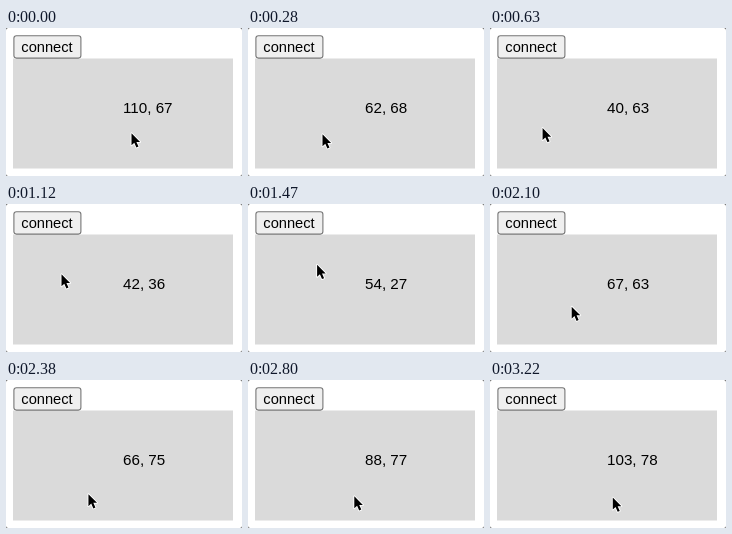
Recreate the animation shown at these times as an HTML page with a canvas. Size 236 by 148 pixels, loop 3.29 s.

```html
<!DOCTYPE html>
<html lang="en">
<head>
<meta charset="utf-8">
<title>Pointer position</title>
<style>
html, body { margin: 0; width: 100%; height: 100%; overflow: hidden; background: #fff; }
canvas { display: block; width: 236px; height: 148px; }
</style>
</head>
<body>
<canvas id="stage"></canvas>
<script>
const W = 236, H = 148, LOOP = 3290, STEP = 70, KEY = 280, LAG = 20;
const canvas = document.getElementById('stage');
const ctx = canvas.getContext('2d');
const dpr = window.devicePixelRatio || 1;
canvas.width = W * dpr;
canvas.height = H * dpr;
ctx.scale(dpr, dpr);

// Key points of the pointer's sweep, evenly spaced; the first precedes the loop.
const path = [
  [192, 104], [125, 104], [74, 105], [54, 102.3], [51.8, 84],
  [55, 69], [65, 60], [80, 64], [86.2, 90], [77, 110],
  [90, 113.5], [105.8, 115], [118, 116], [125, 116.5]
];
const arrow = new Path2D('M0 0V12L2.8 9.4L4.9 14.2L7 13.3L4.9 8.6H8.6Z');
const FONT = '"Liberation Sans", Arial, sans-serif';

function spline(a, b, c, d, u) {
  return b + u / 2 * (c - a + u * (2 * a - 5 * b + 4 * c - d + u * (3 * (b - c) + d - a)));
}

function pointer(t) {
  const p = t / KEY + 1, i = Math.floor(p);
  const at = n => path[Math.max(0, Math.min(path.length - 1, n))];
  return [0, 1].map(k =>
    spline(at(i - 1)[k], at(i)[k], at(i + 1)[k], at(i + 2)[k], p - i));
}

function label(text, x, y, size) {
  ctx.font = size + 'px ' + FONT;
  ctx.fillStyle = '#000';
  ctx.fillText(text, x, y);
}

function drawPage() {
  ctx.fillStyle = '#666';
  ctx.fillRect(0, 0, W, H);
  ctx.fillStyle = '#fff';
  ctx.beginPath();
  ctx.roundRect(0, 0, W, H, 2.5);
  ctx.fill();

  ctx.fillStyle = '#dadada';
  ctx.fillRect(7, 30.5, 220, 110);

  ctx.beginPath();
  ctx.roundRect(7.9, 7.8, 67, 22.3, 2.5);
  ctx.fillStyle = '#efefef';
  ctx.fill();
  ctx.strokeStyle = '#767676';
  ctx.lineWidth = 1.1;
  ctx.stroke();
  label('connect', 15.3, 24, 14.67);
}

function drawPointer(x, y) {
  ctx.save();
  ctx.translate(x + 0.5, y + 1.3);
  ctx.strokeStyle = '#fff';
  ctx.lineWidth = 1.8;
  ctx.lineJoin = 'round';
  ctx.stroke(arrow);
  ctx.fillStyle = '#000';
  ctx.fill(arrow);
  ctx.restore();
}

function draw(t) {
  const [x, y] = pointer(t);
  const [px, py] = pointer(t - LAG);
  const cx = Math.round((px - 8.3) / 1.1);
  const cy = Math.round((py - 30.3) / 1.1);
  drawPage();
  label(cx + ', ' + cy, 117, 85, 15.2);
  drawPointer(x, y);
}

function tick() {
  const t = performance.now() % LOOP;
  draw(Math.floor(t / STEP) * STEP);
  requestAnimationFrame(tick);
}
tick();
</script>
</body>
</html>
```
